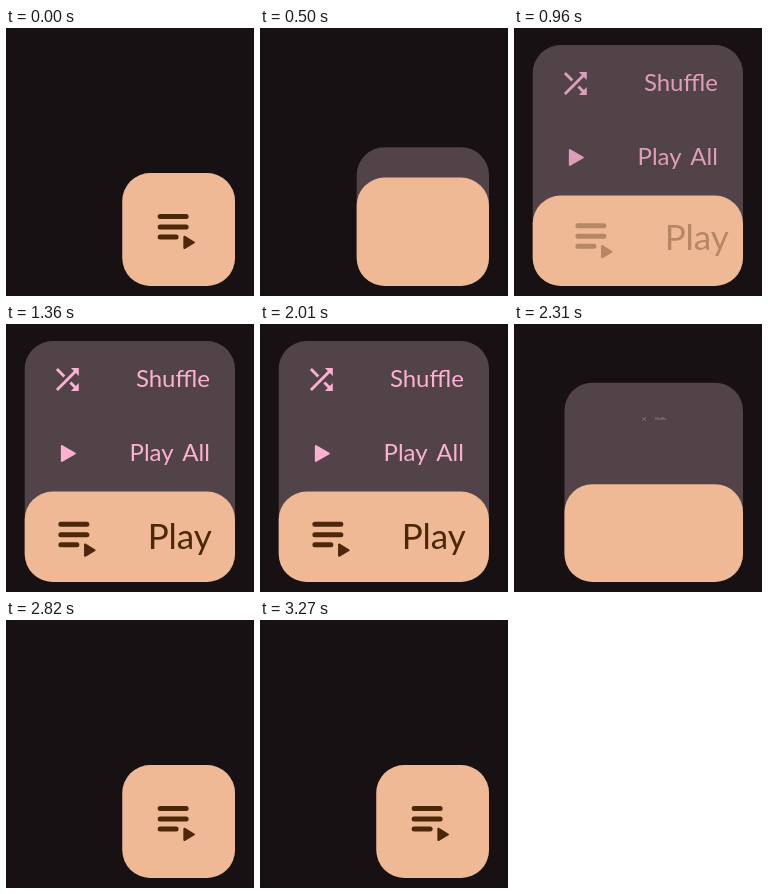
Recreate the animation shown at these times as an HTML page. Size 248 by 268 pixels, loop 3.47 s.

```html
<!DOCTYPE html>
<html lang="en">
<head>
<meta charset="utf-8">
<title>Expanding play button</title>
<style>
html, body { margin: 0; width: 100%; height: 100%; overflow: hidden; background: #171114; }
svg { display: block; width: 100%; height: 100%; }
text { font-family: Lato, sans-serif; font-size: 24px; text-anchor: end; word-spacing: 4px; stroke: none; }
.pink { fill: #fcb0d2; }
.brown { fill: #4d2808; stroke: #4d2808; stroke-linecap: round; stroke-linejoin: round; }
.brown text { font-size: 35px; }
</style>
</head>
<body>
<svg viewBox="0 0 248 268">
  <defs>
    <g id="queue">
      <path d="M-18-13H8M-18-2.5H8M-18 7.5H-2" stroke-width="5" fill="none"/>
      <path d="M6.2 7.2V18.6L15.8 13Z" stroke-width="2"/>
    </g>
  </defs>
  <rect id="back" rx="28" fill="#524348"/>
  <rect id="front" rx="28" fill="#eeb994"/>
  <g id="shuffle" class="pink">
    <path transform="translate(-62.5 0) scale(1.43) translate(-12 -12)" d="M10.59 9.17 5.41 4 4 5.41l5.17 5.17zM14.5 4l2.04 2.04L4 18.59 5.41 20 17.96 7.46 20 9.5V4zM14.83 13.41l-1.41 1.41 3.13 3.13L14.5 20H20v-5.5l-2.04 2.04z"/>
    <text x="80" y="7.5">Shuffle</text>
  </g>
  <g id="all" class="pink">
    <path d="M-68-7.5V7.5L-55 0Z" stroke="#fcb0d2" stroke-width="2" stroke-linejoin="round"/>
    <text x="80" y="7.5">Play All</text>
  </g>
  <g id="play" class="brown">
    <use href="#queue" x="-51" y=".5"/>
    <text x="82" y="12">Play</text>
  </g>
  <use id="icon" class="brown" href="#queue"/>
</svg>
<script>
const LOOP = 3470, STEP = 100, RIGHT = 229, BOTTOM = 258;
const el = id => document.getElementById(id);
const mix = (a, b, p) => a + (b - a) * p;

// Smooth rise from 0 to 1 between times a and b.
function ease(t, a, b) {
  const u = Math.min(1, Math.max(0, (t - a) / (b - a)));
  return u * u * (3 - 2 * u);
}

// Rises over a..b, falls over c..d.
const pulse = (t, a, b, c, d) => ease(t, a, b) - ease(t, c, d);

// The picture advances in steps, offset by 10 ms in the second part.
const hold = t => {
  const shift = t < 810 ? 0 : t < 960 ? 10 : t < 2010 ? 60 : t < 2520 ? 10 : 20;
  return Math.floor((t - shift) / STEP) * STEP + shift;
};

function box(id, x, y) {
  const r = el(id);
  r.setAttribute("x", x);
  r.setAttribute("y", y);
  r.setAttribute("width", RIGHT - x);
  r.setAttribute("height", BOTTOM - y);
}

function place(id, x, y, scale, opacity) {
  const g = el(id);
  g.setAttribute("transform", `translate(${x} ${y}) scale(${scale})`);
  g.setAttribute("opacity", opacity);
}

function draw(time) {
  const t = hold(time);
  const open = pulse(t, 330, 920, 2085, 2675);
  const grow = pulse(t, 680, 960, 2010, 2410);
  const shift = 1 - ease(t, 960, 1260);
  const left = mix(116.3, 18.7, open);
  const top = mix(145, 17, open);
  const lid = mix(145, 167.5, open);
  const cx = (left + RIGHT) / 2, cy = (lid + BOTTOM) / 2;

  box("back", left, top);
  box("front", left, lid);
  place("shuffle", cx, top + 36 + 2.5 * grow, grow, pulse(t, 680, 1060, 2110, 2540));
  place("all", cx, top + 112.5, grow, pulse(t, 680, 1060, 2010, 2310));
  place("play", cx + 9 * shift, cy - 2.5 * shift, 1, pulse(t, 800, 1210, 2010, 2310));
  place("icon", cx - .5, cy, 1, 1 - pulse(t, 150, 500, 2400, 2620));
}

function tick() {
  draw(performance.now() % LOOP);
  requestAnimationFrame(tick);
}
tick();
</script>
</body>
</html>
```
